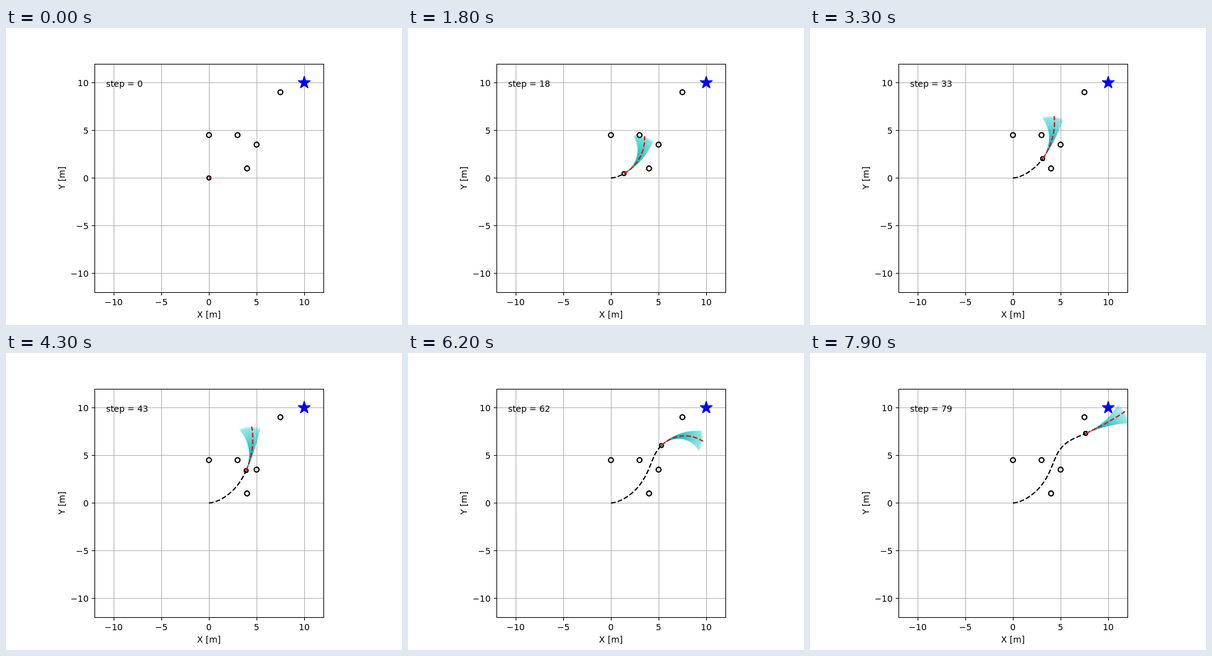
Animation of 640x480 px, one loop 8000 ms. Source, as an HTML page with a canvas:

```html
<!DOCTYPE html>
<html lang="en">
<head>
<meta charset="utf-8">
<title>Path planner</title>
<style>
  html, body { margin: 0; width: 100%; height: 100%; overflow: hidden; background: #fff; }
  svg, canvas { position: absolute; left: 0; top: 0; width: 640px; height: 480px; }
  text { font: 13.89px "DejaVu Sans", sans-serif; }
  .grid { stroke: #b0b0b0; stroke-width: 1.11; }
  .axis { stroke: #000; stroke-width: 1.11; fill: none; }
  .star { fill: #00f; stroke: #00f; stroke-width: 1.39; stroke-linejoin: bevel; }
</style>
</head>
<body>
<svg id="back" viewBox="0 0 640 480"></svg>
<canvas id="plot" width="640" height="480"></canvas>
<svg id="front" viewBox="0 0 640 480">
  <rect class="axis" x="143.5" y="58.5" width="370" height="369"/>
  <text x="328" y="468" text-anchor="middle">X [m]</text>
  <text transform="translate(95 242.4) rotate(-90)" text-anchor="middle">Y [m]</text>
  <text id="label" x="161.7" y="95">step = 0</text>
</svg>
<script>
const STEPS = 80, STEP_MS = 100, SCALE = 15.4;
const HORIZON = 3, TOP_SPEED = 1.575, ACCEL = 0.084, YAW_REACH = 0.155;
const OBSTACLES = [[4, 1], [0, 4.5], [3, 4.5], [5, 3.5], [7.5, 9]];

// step, x, y, heading in degrees, metres per step
const ROUTE = [
  [0, 0, 0, 0, 0], [12, 0.65, 0.13, 18, 0.105], [18, 1.37, 0.46, 29, 0.155],
  [24, 2.15, 1, 39, 0.158], [43, 3.9, 3.4, 66, 0.158], [54, 4.57, 5, 65, 0.158],
  [62, 5.3, 6.03, 45, 0.158], [79, 7.63, 7.3, 24, 0.158]
];
// step, yaw rate at the middle of the fan, offset of the chosen arc
const STEER = [
  [0, 0.05, 0], [12, 0.46, 0], [24, 0.3, -0.01], [43, 0.225, -0.03],
  [46, 0.19, -0.1], [54, -0.2, -0.16], [62, -0.455, 0], [79, 0.04, 0.02]
];

const px = x => 328 + x * SCALE;
const py = y => 242.4 - y * SCALE;

function drawAxes() {
  const back = document.getElementById("back");
  const front = document.getElementById("front");
  const line = (x1, y1, x2, y2, cls) =>
    `<line class="${cls}" x1="${x1}" y1="${y1}" x2="${x2}" y2="${y2}"/>`;
  let grid = "", ticks = "";
  for (let v = -10; v <= 10; v += 5) {
    const x = Math.round(px(v)) + 0.5, y = Math.round(py(v)) + 0.5;
    const name = String(v).replace("-", "\u2212");
    grid += line(x, 58, x, 427, "grid") + line(143, y, 513, y, "grid");
    ticks += line(x, 427.5, x, 432.4, "axis") + line(138.6, y, 143.5, y, "axis");
    ticks += `<text x="${px(v)}" y="448" text-anchor="middle">${name}</text>`;
    ticks += `<text x="133.5" y="${y + 5.5}" text-anchor="end">${name}</text>`;
  }
  const star = Array.from({ length: 10 }, (_, i) => {
    const r = i % 2 ? 10.42 * 0.382 : 10.42, a = i * Math.PI / 5;
    return [px(10) + r * Math.sin(a), py(10) - r * Math.cos(a)].join();
  });
  back.innerHTML = grid;
  front.insertAdjacentHTML("afterbegin", `<polygon class="star" points="${star.join(" ")}"/>`);
  front.insertAdjacentHTML("beforeend", ticks);
}

function segment(keys, n) {
  let i = 0;
  while (i < keys.length - 2 && n >= keys[i + 1][0]) i++;
  const a = keys[i], b = keys[i + 1];
  return [a, b, (n - a[0]) / (b[0] - a[0])];
}

// Hermite curve through the route
function position(n) {
  const [a, b, u] = segment(ROUTE, n);
  const span = b[0] - a[0], u2 = u * u, u3 = u2 * u;
  const slope = (k, fn) => k[4] * span * fn(k[3] * Math.PI / 180);
  const mix = (i, fn) =>
    (2 * u3 - 3 * u2 + 1) * a[i] + (3 * u2 - 2 * u3) * b[i] +
    (u3 - 2 * u2 + u) * slope(a, fn) + (u3 - u2) * slope(b, fn);
  return [mix(1, Math.cos), mix(2, Math.sin)];
}

function heading(n) {
  const [x1, y1] = position(Math.max(0, n - 0.01));
  const [x2, y2] = position(n + 0.01);
  return Math.atan2(y2 - y1, x2 - x1);
}

function steering(n) {
  const [a, b, u] = segment(STEER, n);
  return [1, 2].map(i => a[i] + (b[i] - a[i]) * u);
}

// Points reached at constant speed and yaw rate
function forecast([x, y], angle, speed, yaw) {
  const count = 30, dt = HORIZON / count, points = [[x, y]];
  for (let i = 0; i < count; i++) {
    const mid = angle + yaw * (i + 0.5) * dt;
    x += speed * dt * Math.cos(mid);
    y += speed * dt * Math.sin(mid);
    points.push([x, y]);
  }
  return points;
}

const ctx = document.getElementById("plot").getContext("2d");
const label = document.getElementById("label");

function stroke(points, color, width, dash = []) {
  ctx.beginPath();
  for (const [x, y] of points) ctx.lineTo(px(x), py(y));
  ctx.strokeStyle = color;
  ctx.lineWidth = width;
  ctx.lineCap = "butt";
  ctx.lineJoin = "round";
  ctx.setLineDash(dash);
  ctx.stroke();
}

function ring([x, y], radius) {
  ctx.beginPath();
  ctx.arc(px(x), py(y), radius * SCALE, 0, 6.27);
  ctx.strokeStyle = "#000";
  ctx.lineWidth = 2.08;
  ctx.lineCap = "square";
  ctx.setLineDash([]);
  ctx.stroke();
}

function draw(n) {
  const dash = [7.7, 3.33];
  const here = position(n), angle = heading(n);
  const [yaw, offset] = steering(n);
  const wanted = ACCEL * (n + 1);
  const speed = Math.min(TOP_SPEED, wanted);
  const slowest = Math.max(0, Math.min(TOP_SPEED + ACCEL, wanted + ACCEL / 2) - 2 * ACCEL);

  ctx.clearRect(0, 0, 640, 480);
  ctx.save();
  ctx.beginPath();
  ctx.rect(143.2, 57.6, 369.6, 369.6);
  ctx.clip();

  for (let v = speed; v >= slowest; v -= 0.02) {
    for (let i = -8; i <= 8; i++) {
      stroke(forecast(here, angle, v, yaw + i / 8 * YAW_REACH), "rgba(0,191,191,0.3)", 0.7);
    }
  }
  OBSTACLES.forEach(p => ring(p, 0.25));
  stroke(Array.from({ length: n + 1 }, (_, i) => position(i)), "#000", 2.08, dash);
  ring(here, 0.2);
  stroke(forecast(here, angle, speed, yaw + offset), "#f00", 2.08, dash);
  ctx.restore();
  label.textContent = "step = " + n;
}

let shown = -1;
const start = performance.now();
function tick() {
  const n = Math.floor((performance.now() - start) / STEP_MS) % STEPS;
  if (n !== shown) draw(shown = n);
  requestAnimationFrame(tick);
}

drawAxes();
tick();
</script>
</body>
</html>
```
